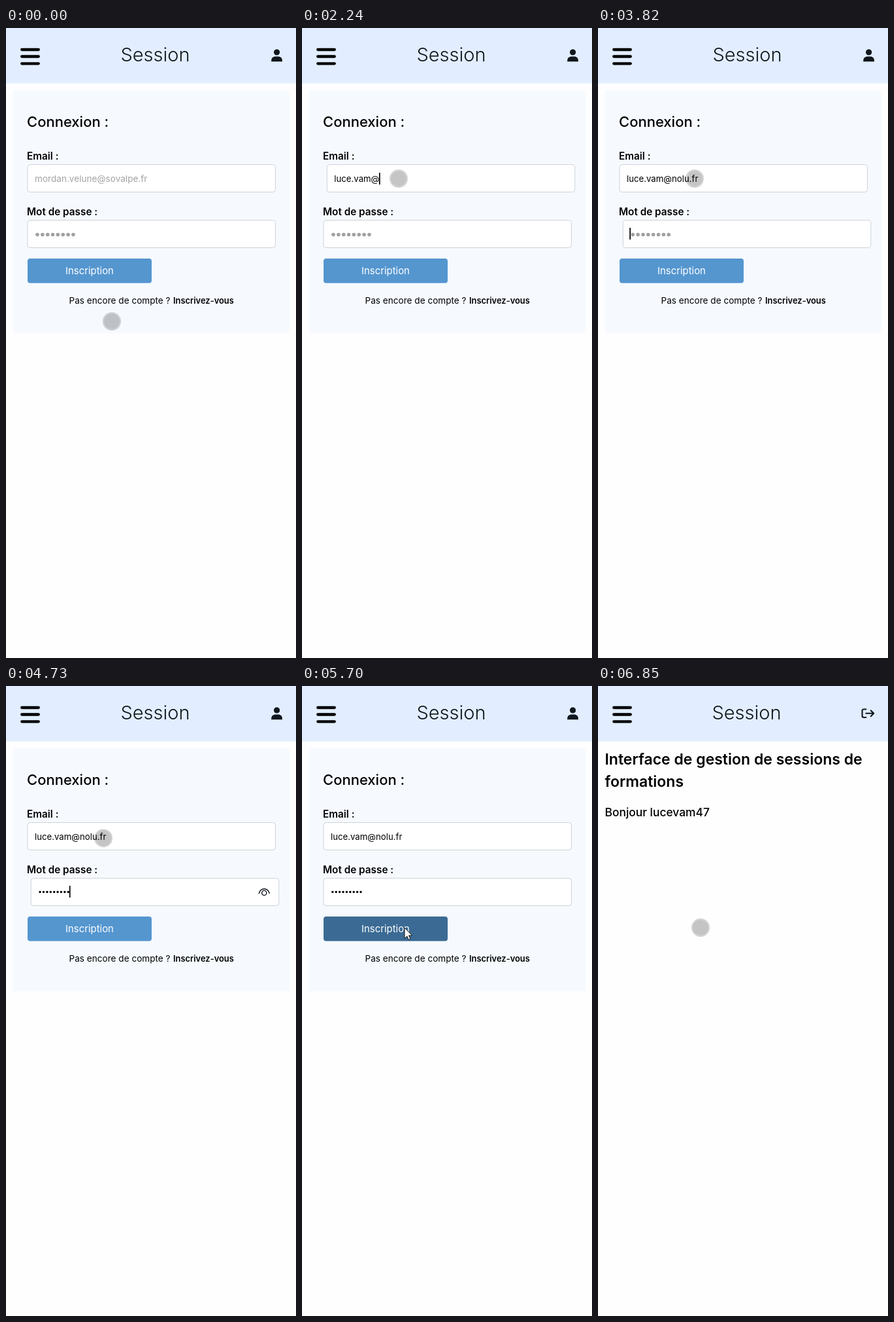
An HTML page that plays this animation: 444 by 962 pixels, repeating every 7.36 s.

```html
<!DOCTYPE html>
<html lang="fr">
<head>
<meta charset="utf-8">
<title>Session</title>
<style>
  html, body { margin: 0; width: 100%; height: 100%; overflow: hidden; background: #fefefe; }
  svg { display: block; width: 444px; height: 962px; }
  text { font-family: Inter, "Open Sans", sans-serif; white-space: pre; fill: #000; }
  .title { font-size: 29px; font-weight: 300; text-anchor: middle; fill: #10161d; }
  .head { font-size: 22px; font-weight: 500; }
  .big { font-size: 23px; font-weight: 600; }
  .label { font-size: 15.3px; font-weight: 600; }
  .value { font-size: 13.2px; font-weight: 400; }
  .hint { font-size: 13.6px; fill: #a3a3a3; }
  .ask { font-size: 13.6px; }
  .link { font-size: 12.9px; font-weight: 600; }
  .action { font-size: 14.9px; text-anchor: middle; fill: #fff; }
  .field { fill: #fff; stroke: #ced2d7; }
  .icon { fill: none; stroke: #10161d; stroke-linecap: round; stroke-linejoin: round; }
</style>
</head>
<body>
<svg viewBox="0 0 444 962">
  <rect width="444" height="962" fill="#fefefe"/>
  <rect width="444" height="84.5" fill="#e2eeff"/>
  <path d="M24.2 33H49.8M24.2 43.5H49.8M24.2 54.3H49.8" stroke="#000" stroke-width="4.3" stroke-linecap="round"/>
  <text id="title" class="title" x="228.5" y="51">Session</text>

  <g id="login">
    <g fill="#10161d">
      <circle cx="414.6" cy="37" r="4.6"/>
      <path d="M406.2 51.2V49.4A6 6 0 0 1 412.2 43.4H417A6 6 0 0 1 423 49.4V51.2Z"/>
    </g>
    <rect x="11" y="95" width="423" height="371" fill="#f6faff"/>
    <text class="head" x="32" y="151">Connexion :</text>
    <text class="label" x="32" y="201">Email :</text>
    <text class="label" x="32" y="286">Mot de passe :</text>

    <g id="mail">
      <rect class="field" x="33" y="208.5" width="379.5" height="42" rx="4"/>
      <text id="mailHint" class="value hint" x="44" y="235">mordan.velune@sovalpe.fr</text>
      <text id="mailText" class="value" x="44" y="235"></text>
      <rect id="mailCaret" y="221" width="1.7" height="18"/>
    </g>

    <g id="pass">
      <rect class="field" x="33" y="293.5" width="379.5" height="42" rx="4"/>
      <g id="passHint" fill="#a0a0a0"></g>
      <g id="passDots"></g>
      <rect id="passCaret" y="305" width="1.7" height="18"/>
      <g id="eye" class="icon" stroke-width="1.4">
        <path d="M382 316.5C385 307.5 395 307.5 398 316.5"/>
        <circle cx="390" cy="316" r="3.6"/>
      </g>
    </g>

    <rect id="button" x="33" y="352" width="190" height="37.5" rx="4"/>
    <text class="action" x="128" y="376">Inscription</text>
    <text class="value ask" x="96.5" y="421">Pas encore de compte ?</text>
    <text class="value link" x="256" y="421">Inscrivez-vous</text>
  </g>

  <g id="home">
    <path class="icon" stroke-width="2.1" d="M410.3 35.5H407Q404.5 35.5 404.5 38V45.5Q404.5 48 407 48H410.3M410.3 41.8H422M417.8 37.4L422.2 41.8L417.8 46.2"/>
    <text class="big" x="10.5" y="120">Interface de gestion de sessions de</text>
    <text class="big" x="10.5" y="154">formations</text>
    <text x="10.5" y="199" font-size="17.4" font-weight="500">Bonjour lucevam47</text>
  </g>

  <g id="touch">
    <circle r="14" fill="#000" fill-opacity=".17"/>
    <circle r="11.8" fill="#000" fill-opacity=".07"/>
  </g>
  <path id="arrow" d="M157 369V385.5L160.8 382L163.4 387.6L166 386.4L163.5 381H168.6Z" fill="#fff" stroke="#111" stroke-width="1"/>
</svg>

<script>
const LOOP = 7360;
const MAIL = 'luce.vam@nolu.fr';
const MAIL_KEYS = [1430, 1520, 1610, 1700, 1800, 1900, 2000, 2100, 2210, 2330, 2440, 2540, 2650, 2760, 2870, 2980];
const PASS_KEYS = [4170, 4240, 4300, 4450, 4500, 4550, 4600, 4650, 4700];
const FOCUS_MAIL = 560, FOCUS_PASS = 3480, PRESS = 5400, SUBMIT = 6000;
const BLUE = [85, 150, 207], DARK = [59, 107, 148];

const $ = id => document.getElementById(id);
const show = (id, on) => $(id).setAttribute('display', on ? 'inline' : 'none');
const ramp = (t, from, length) => Math.min(1, Math.max(0, (t - from) / length));
const ease = p => p < .5 ? 4 * p ** 3 : 1 - 4 * (1 - p) ** 3;
const smooth = p => p * p * (3 - 2 * p);
const mix = (a, b, p) => a + (b - a) * p;
const bend = (a, b, c, p) => mix(mix(a, b, p), mix(b, c, p), p);

function dotRow(id, count, x, y, step, r) {
  for (let i = 0; i < count; i++) {
    const dot = document.createElementNS('http://www.w3.org/2000/svg', 'circle');
    dot.setAttribute('cx', x + i * step);
    dot.setAttribute('cy', y);
    dot.setAttribute('r', r);
    $(id).append(dot);
  }
}
dotRow('passHint', 8, 48, 315.5, 7.85, 2.8);
dotRow('passDots', 9, 46.8, 314.5, 5.4, 1.7);

const typed = (keys, t) => keys.filter(k => k <= t).length;

// The caret restarts its blink at focus and at each key.
function caretOn(t, from, to, keys) {
  const count = typed(keys, t);
  const since = t - (count ? keys[count - 1] : from);
  return t >= from && t < to && since % 1000 < 500;
}

const slide = (id, t, from, to) => {
  const x = 5.3 * (smooth(ramp(t, from, 190)) - smooth(ramp(t, to, 190)));
  $(id).setAttribute('transform', `translate(${x} 0)`);
};

function pointer(t) {
  if (t < 4000) {
    const p = smooth(ramp(t, 40, 480));
    return [mix(162, 148, p), mix(448, 230, p)];
  }
  const p = ease(ramp(t, 4650, 500));
  return [bend(148, 181, 157, p), bend(230, 300, 369, p)];
}

function draw(t) {
  const home = t >= SUBMIT;
  show('login', !home);
  show('home', home);
  $('title').setAttribute('x', home ? 227.5 : 228.5);

  slide('mail', t, FOCUS_MAIL, FOCUS_PASS);
  const chars = typed(MAIL_KEYS, t);
  const text = $('mailText');
  text.textContent = MAIL.slice(0, chars);
  show('mailHint', !chars);
  show('mailCaret', caretOn(t, FOCUS_MAIL, FOCUS_PASS, MAIL_KEYS));
  $('mailCaret').setAttribute('x', 43.6 + (chars && !home ? text.getComputedTextLength() : 0));

  slide('pass', t, FOCUS_PASS, PRESS);
  const dots = typed(PASS_KEYS, t);
  [...$('passDots').children].forEach((dot, i) => dot.setAttribute('opacity', i < dots ? 1 : 0));
  show('passHint', !dots);
  show('passCaret', caretOn(t, FOCUS_PASS, PRESS, PASS_KEYS));
  $('passCaret').setAttribute('x', 43 + dots * 5.4);
  show('eye', dots && t < PRESS);

  const dark = ramp(t, PRESS, 250);
  $('button').setAttribute('fill', `rgb(${BLUE.map((c, i) => Math.round(mix(c, DARK[i], dark)))})`);

  const arrow = t >= PRESS && !home;
  show('arrow', arrow);
  show('touch', !arrow);
  $('touch').setAttribute('transform', `translate(${pointer(t)})`);
}

const start = performance.now();
function tick() {
  draw((performance.now() - start) % LOOP);
  requestAnimationFrame(tick);
}
tick();
</script>
</body>
</html>
```
